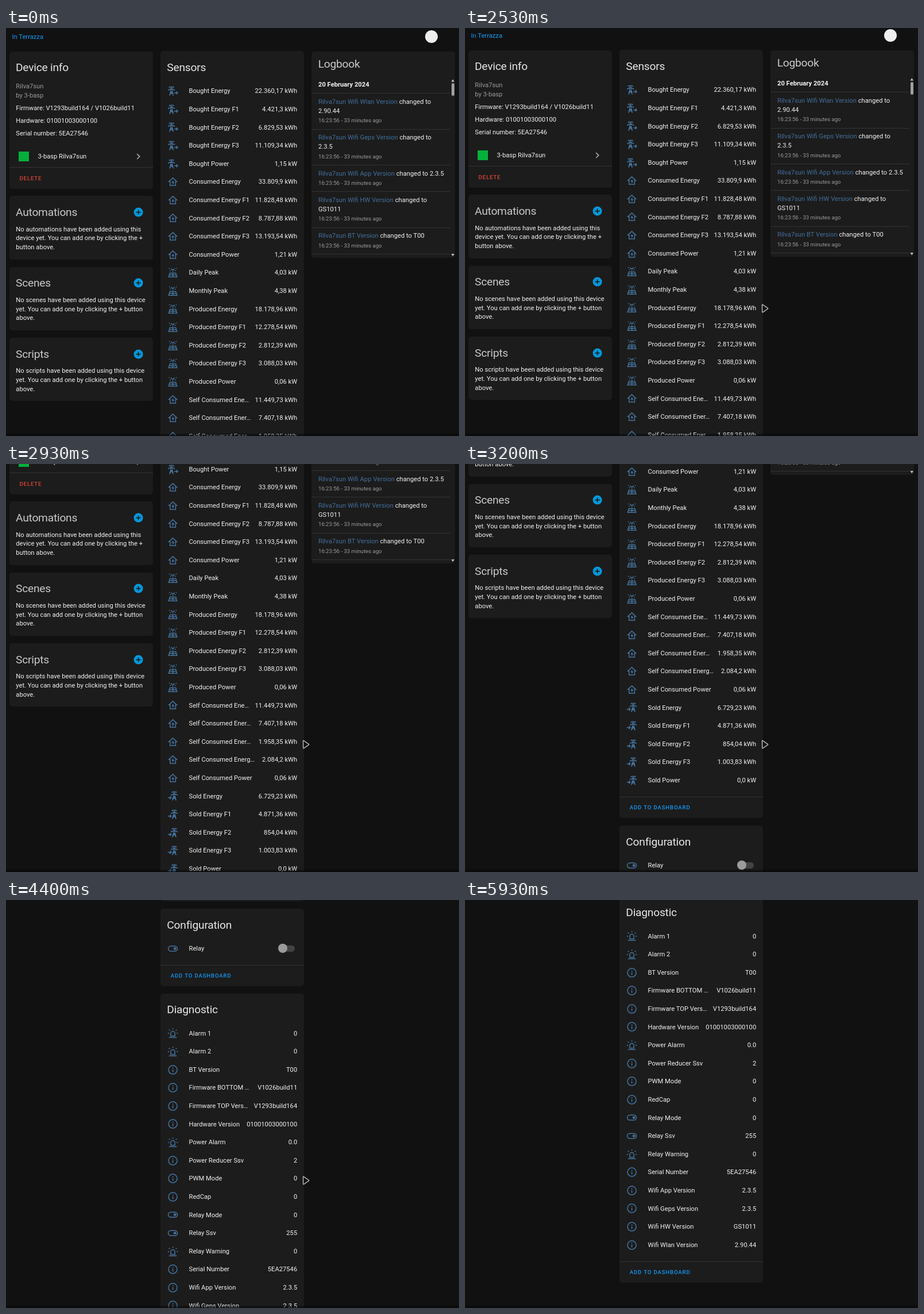
These frames come from a looping animation (789 by 710 pixels, 6.47 s). An HTML page:

```html
<!DOCTYPE html>
<html lang="en">
<head>
<meta charset="utf-8">
<title>Device page</title>
<style>
html, body { margin: 0; width: 100%; height: 100%; overflow: hidden; background: #111; }
body { position: relative; font: 11.2px/16px Roboto, sans-serif; color: #f2f2f2; }
#page { position: absolute; left: 0; top: 0; width: 789px; height: 1874px; animation: scroll 6.47s step-end infinite; }
#page > * { position: absolute; white-space: pre; }
.card { width: 250px; background: #1c1c1c; border-radius: 5px; }
.h { font-size: 19.2px; letter-spacing: -.012em; color: #e6e6e6; }
.sub { color: #c9c9c9; }
.dim { color: #9b9b9b; }
.small { font-size: 9.6px; color: #9b9b9b; }
.btn { font-size: 9.6px; font-weight: 500; letter-spacing: .0892em; color: #149af8; }
.red { color: #db4437; }
.blue { color: #149af8; }
.bold { font-weight: 700; }
.link { color: #426f9d; }
.line { height: 1px; background: #333; }
svg { display: block; overflow: visible; }
.icon { width: 19.2px; height: 19.2px; fill: none; stroke: #44739e; stroke-width: 1.9; }
.icon .f { fill: #44739e; stroke: none; }
.tri { fill: #c4c4c4; }
#edge { position: absolute; left: 0; right: 0; top: 706px; height: 3px; background: rgba(0,0,0,.3); border-bottom: 1px solid #0a0a0a; }
#cursor { position: absolute; left: .5px; top: .5px; width: 13px; height: 16px; fill: #161616; stroke: #d4d4d4; stroke-width: 1.2; stroke-linejoin: round; animation: point 6.47s step-end infinite; }

@keyframes scroll {
  0% { transform: translateY(0); }
  39.073% { transform: translateY(-2px); }
  40.155% { transform: translateY(-27px); animation-timing-function: steps(5); }
  45.255% { transform: translateY(-227px); animation-timing-function: steps(4); }
  49.428% { transform: translateY(-381px); animation-timing-function: steps(3); }
  52.519% { transform: translateY(-442px); }
  54.529% { transform: translateY(-450px); }
  55.611% { transform: translateY(-491px); animation-timing-function: steps(2); }
  57.62% { transform: translateY(-553px); }
  60.711% { transform: translateY(-557px); }
  61.793% { transform: translateY(-600px); animation-timing-function: steps(5); }
  66.893% { transform: translateY(-975px); }
  67.975% { transform: translateY(-995px); }
  73.076% { transform: translateY(-1001px); }
  74.158% { transform: translateY(-1055px); }
  75.24% { transform: translateY(-1128px); }
  76.167%, 100% { transform: translateY(-1164px); }
}
@keyframes point {
  0% { transform: translate(800px, 720px); }
  4.142% { transform: translate(778px, 698px); animation-timing-function: steps(4); }
  8.161% { transform: translate(682px, 620px); animation-timing-function: steps(5); }
  13.416% { transform: translate(563px, 512px); }
  14.343% { transform: translate(529px, 488px); }
  15.425% { transform: translate(515px, 479px); }
  83.431% { transform: translate(507px, 483px); animation-timing-function: steps(7); }
  90.696% { transform: translate(122px, 697px); }
  91.623%, 100% { transform: translate(100px, 720px); }
}
</style>
</head>
<body>
<div id="page"></div>
<div id="edge"></div>
<svg id="cursor" viewBox="0 0 13 16"><path d="M1.5 1.8Q1.7 .8 2.7 1.4L11.4 7.4Q12.2 8.1 11.3 8.7L3 14.6Q1.8 15.2 1.7 14Z"/></svg>
<script>
const BRAND = 'Rilva7sun', MAKER = '3-basp', PITCH = 31.6, GAP = 12.8;
const out = [];
const add = html => out.push(html);

// y is the middle of the capitals, half a pixel below the middle of the line box
const text = (x, y, s, cls = '') => add(`<span class="${cls}" style="left:${x}px;top:${y - 7.5}px">${s}</span>`);
const right = (x, y, s) => add(`<span style="right:${789 - x}px;top:${y - 7.5}px">${s}</span>`);
const box = (x, y, w, h, style) => add(`<i style="left:${x}px;top:${y}px;width:${w}px;height:${h}px;${style}"></i>`);
const card = (x, y, h) => add(`<div class="card" style="left:${x}px;top:${y}px;height:${h}px"></div>`);
const line = (x, y, w) => add(`<div class="line" style="left:${x}px;top:${y}px;width:${w}px"></div>`);
const svg = (x, y, size, body, cls = '') =>
  add(`<svg class="${cls}" style="left:${x - size / 2}px;top:${y - size / 2}px" width="${size}" height="${size}" viewBox="0 0 24 24">${body}</svg>`);

const path = d => `<path d="${d}"/>`;
const tower = path('M4 5.2 5 3h8l1 2.2M2 11.2 3.2 9h11.6l1.2 2.2M7.2 9 8 5.5h2l.8 3.5M7.8 11 5 22M10.2 11 13 22M7.4 13.5 12.4 20M10.6 13.5 5.6 20');
const icons = {
  out: tower + path('M15 16h7M19.5 13l3 3-3 3'),
  in: `<g transform="translate(6)">${tower}</g>` + path('M1 16h7M5.5 13l3 3-3 3'),
  home: path('M12 3.6 20.5 11.6H18V20H6v-8.4H3.5z') + '<path class="f" d="M13 8.5 9 14h2.5v4l4-5.5H13z"/>',
  sun: path('M5.5 13h13l2.5 8.5H3zM4 17.2h16M12 13v8.5M8.8 3.2a3.2 3.2 0 0 0 6.4 0M3.5 3h2M18.5 3h2M12 8.5v2M5.8 8.6l1.5-1.5M18.2 8.6l-1.5-1.5'),
  bell: path('M7.5 18.5v-6a4.5 4.5 0 0 1 9 0v6zM3.5 21.5h17M12 1.5v3M3.5 4.5l2 2M20.5 4.5l-2 2M1 12.5h3M20 12.5h3'),
  info: '<circle cx="12" cy="12" r="9.4"/>' + path('M12 11v6M12 7v2'),
  toggle: '<rect x="2" y="6.5" width="20" height="11" rx="5.5"/><circle class="f" cx="16.5" cy="12" r="3"/>'
};

// Adds a list card and gives the top of the next one
function listCard(top, title, rows) {
  const last = top + 69.5 + (rows.length - 1) * PITCH;
  card(269, top, last + 65.5 - top);
  text(280.3, top + 28.3, title, 'h');
  rows.forEach(([icon, name, value], i) => {
    const y = top + 69.5 + i * PITCH;
    svg(290.6, y, 19.2, icons[icon], 'icon');
    text(318.5, y, name);
    if (value !== undefined) return right(507.2, y, value);
    box(474.5, y - 5.5, 28, 11, 'border-radius:6px;background:#434343');
    box(473.5, y - 8, 16, 16, 'border-radius:50%;background:#9b9b9b');
  });
  line(269, last + 29, 250);
  text(286.7, last + 47, 'ADD TO DASHBOARD', 'btn');
  return last + 65.5 + GAP;
}

// Expands one meter group into its rows
const group = (icon, name, energies, power) => [
  ...energies.map((v, i) => [icon, name + ' Energy' + (i ? ' F' + i : ''), v + ' kWh']),
  [icon, name + ' Power', power + ' kW']
];

// Header
text(10.5, 15, 'In Terrazza', 'blue');
box(730, 4, 22, 22, 'border-radius:50%;background:#eee');

// Device card
card(6, 40.5, 239);
text(17, 68.5, 'Device info', 'h');
text(17.3, 101, BRAND, 'dim');
text(17.3, 117, 'by ' + MAKER, 'dim');
text(17.3, 139, 'Firmware: V1293build164 / V1026build11');
text(17.3, 161, 'Hardware: 01001003000100');
text(17.3, 183, 'Serial number: 5EA27546');
box(22, 214.5, 17.5, 17.5, 'background:#06b03c');
text(55.5, 223, `${MAKER} ${BRAND}`);
svg(230.5, 223.3, 19.2, '<path d="M9 6.5l5.7 5.5L9 17.5" fill="none" stroke="#aaa" stroke-width="2"/>');
line(6, 242, 250);
text(23.5, 261, 'DELETE', 'btn red');

// Automations, scenes and scripts
[
  ['Automations', ['No automations have been added using this', 'device yet. You can add one by clicking the +', 'button above.']],
  ['Scenes', ['No scenes have been added using this device', 'yet. You can add one by clicking the + button', 'above.']],
  ['Scripts', ['No scripts have been added using this device', 'yet. You can add one by clicking the + button', 'above.']]
].forEach(([title, lines], i) => {
  const y = 292.3 + i * 123.25;
  card(6, y, 110.5);
  text(17, y + 28.3, title, 'h sub');
  svg(230.5, y + 28.5, 19.2, '<circle cx="12" cy="12" r="10" fill="#0498dc"/><path d="M12 7v10M7 12h10" stroke="#1c1c1c" stroke-width="2"/>');
  lines.forEach((s, j) => text(17.3, y + 57.7 + j * 15.8, s));
});

// List cards
let next = listCard(40.3, 'Sensors', [
  ...group('out', 'Bought', ['22.360,17', '4.421,3', '6.829,53', '11.109,34'], '1,15'),
  ...group('home', 'Consumed', ['33.809,9', '11.828,48', '8.787,88', '13.193,54'], '1,21'),
  ['sun', 'Daily Peak', '4,03 kW'],
  ['sun', 'Monthly Peak', '4,38 kW'],
  ...group('sun', 'Produced', ['18.178,96', '12.278,54', '2.812,39', '3.088,03'], '0,06'),
  ['home', 'Self Consumed Ene…', '11.449,73 kWh'],
  ['home', 'Self Consumed Ener…', '7.407,18 kWh'],
  ['home', 'Self Consumed Ener…', '1.958,35 kWh'],
  ['home', 'Self Consumed Energ…', '2.084,2 kWh'],
  ['home', 'Self Consumed Power', '0,06 kW'],
  ...group('in', 'Sold', ['6.729,23', '4.871,36', '854,04', '1.003,83'], '0,0')
]);
next = listCard(next, 'Configuration', [['toggle', 'Relay']]);
listCard(next, 'Diagnostic', [
  ['bell', 'Alarm 1', '0'],
  ['bell', 'Alarm 2', '0'],
  ['info', 'BT Version', 'T00'],
  ['info', 'Firmware BOTTOM …', 'V1026build11'],
  ['info', 'Firmware TOP Vers…', 'V1293build164'],
  ['info', 'Hardware Version', '01001003000100'],
  ['bell', 'Power Alarm', '0.0'],
  ['info', 'Power Reducer Ssv', '2'],
  ['info', 'PWM Mode', '0'],
  ['info', 'RedCap', '0'],
  ['toggle', 'Relay Mode', '0'],
  ['toggle', 'Relay Ssv', '255'],
  ['bell', 'Relay Warning', '0'],
  ['info', 'Serial Number', '5EA27546'],
  ['info', 'Wifi App Version', '2.3.5'],
  ['info', 'Wifi Geps Version', '2.3.5'],
  ['info', 'Wifi HW Version', 'GS1011'],
  ['info', 'Wifi Wlan Version', '2.90.44']
]);

// Logbook
card(532.3, 40.5, 359.5);
text(543.7, 62.3, 'Logbook', 'h sub');
text(544, 98, '20 February 2024', 'bold');
line(532, 113, 242);
let y = 128;
[
  ['Wifi Wlan', '2.90.44', true],
  ['Wifi Geps', '2.3.5', true],
  ['Wifi App', '2.3.5'],
  ['Wifi HW', 'GS1011', true],
  ['BT', 'T00']
].forEach(([name, value, wrap]) => {
  text(544, y, `<span class="link">${BRAND} ${name} Version</span> changed to${wrap ? '' : ' ' + value}`);
  if (wrap) text(544, y += 16.4, value);
  text(544, y + 16.4, '16:23:56 - 33 minutes ago', 'small');
  line(532, y + 31.2, 242);
  y += 46.1;
});
svg(778, 91, 6.5, path('M2 20h20L12 5z'), 'tri');
svg(778, 395, 6.5, path('M2 4h20L12 19z'), 'tri');
box(775.5, 96, 5, 21.5, 'border-radius:3px;background:#9f9f9f');

document.getElementById('page').innerHTML = out.join('');
</script>
</body>
</html>
```
